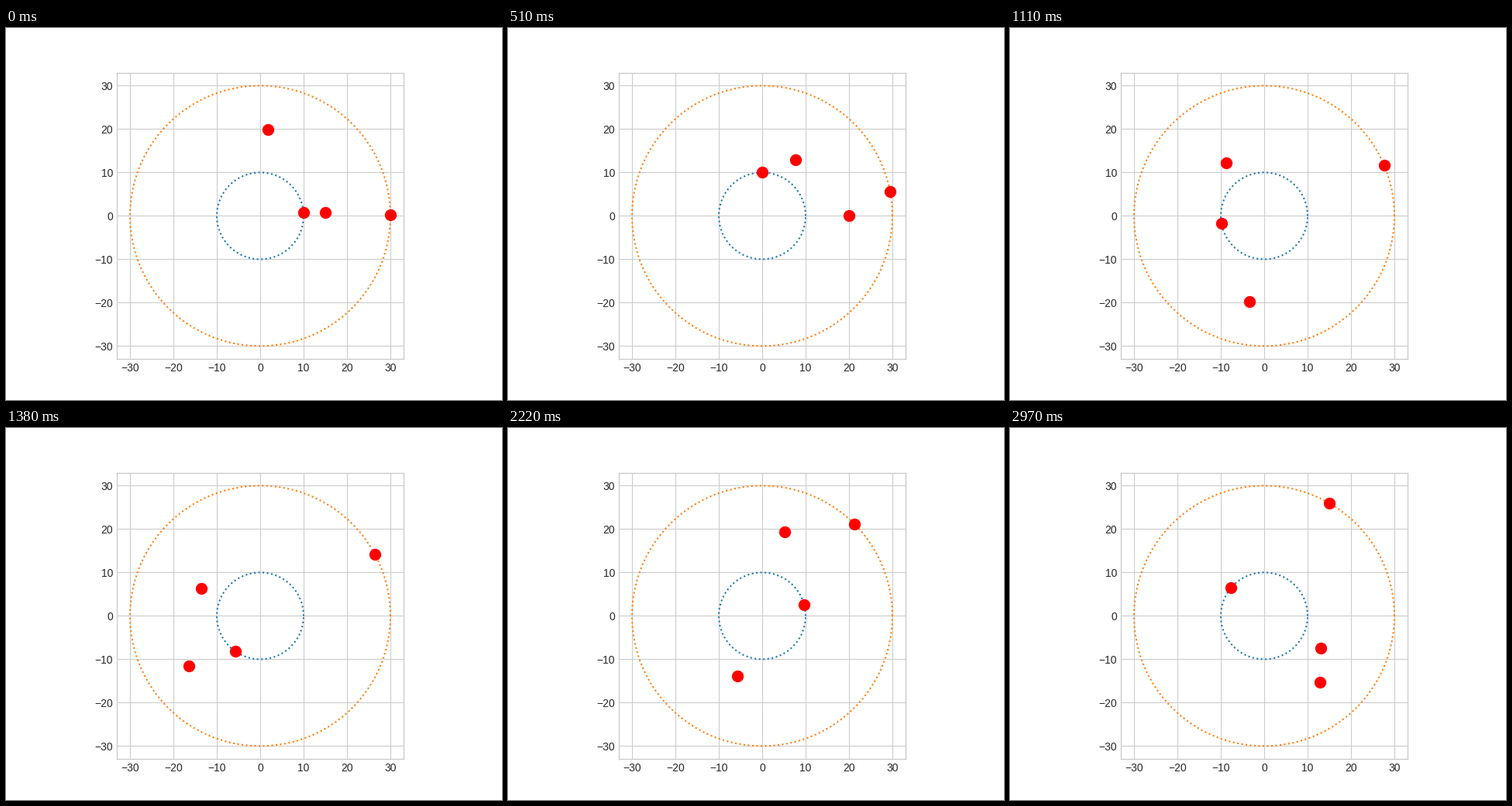
These frames come from a looping animation (640x480 px, 3000 ms). A matplotlib script:

```python
import numpy as np
import matplotlib.pyplot as plt
from matplotlib.animation import FuncAnimation

FRAMES = 100

# radius, start angle and step per frame (degrees)
BODIES = [
    (10, 0, 5.0),
    (15, 0, 3.3),
    (20, 90, -5.0),
    (30, 0, 0.6),
]

plt.rcParams.update({
    "font.family": "Liberation Sans",
    "font.size": 10,
    "axes.edgecolor": "0.8",
    "axes.linewidth": 1,
    "axes.axisbelow": True,
    "grid.color": "0.8",
    "grid.linestyle": "-",
    "grid.linewidth": 0.8,
    "xtick.color": "0.15",
    "ytick.color": "0.15",
    "xtick.major.size": 0,
    "ytick.major.size": 0,
})


def polar(radius, angle):
    return radius * np.cos(angle), radius * np.sin(angle)


fig, ax = plt.subplots(figsize=(6.4, 4.8), dpi=100)
ax.set_aspect("equal")
ax.set(xlim=(-33, 33), ylim=(-33, 33))
ticks = np.arange(-30, 31, 10)
ax.set_xticks(ticks)
ax.set_yticks(ticks)
ax.grid(True)

turn = np.linspace(0, 2 * np.pi, 100)
for radius, color in ((10, "tab:blue"), (30, "tab:orange")):
    ax.plot(*polar(radius, turn), ":", color=color, lw=1.5)

dots = [ax.plot([], [], "o", color="red", ms=10)[0] for _ in BODIES]


def update(i):
    for dot, (radius, start, step) in zip(dots, BODIES):
        x, y = polar(radius, np.radians(start + step * (i + 1)))
        dot.set_data([x], [y])
    return dots


anim = FuncAnimation(fig, update, frames=FRAMES, interval=30, repeat=True)
plt.show()
```
